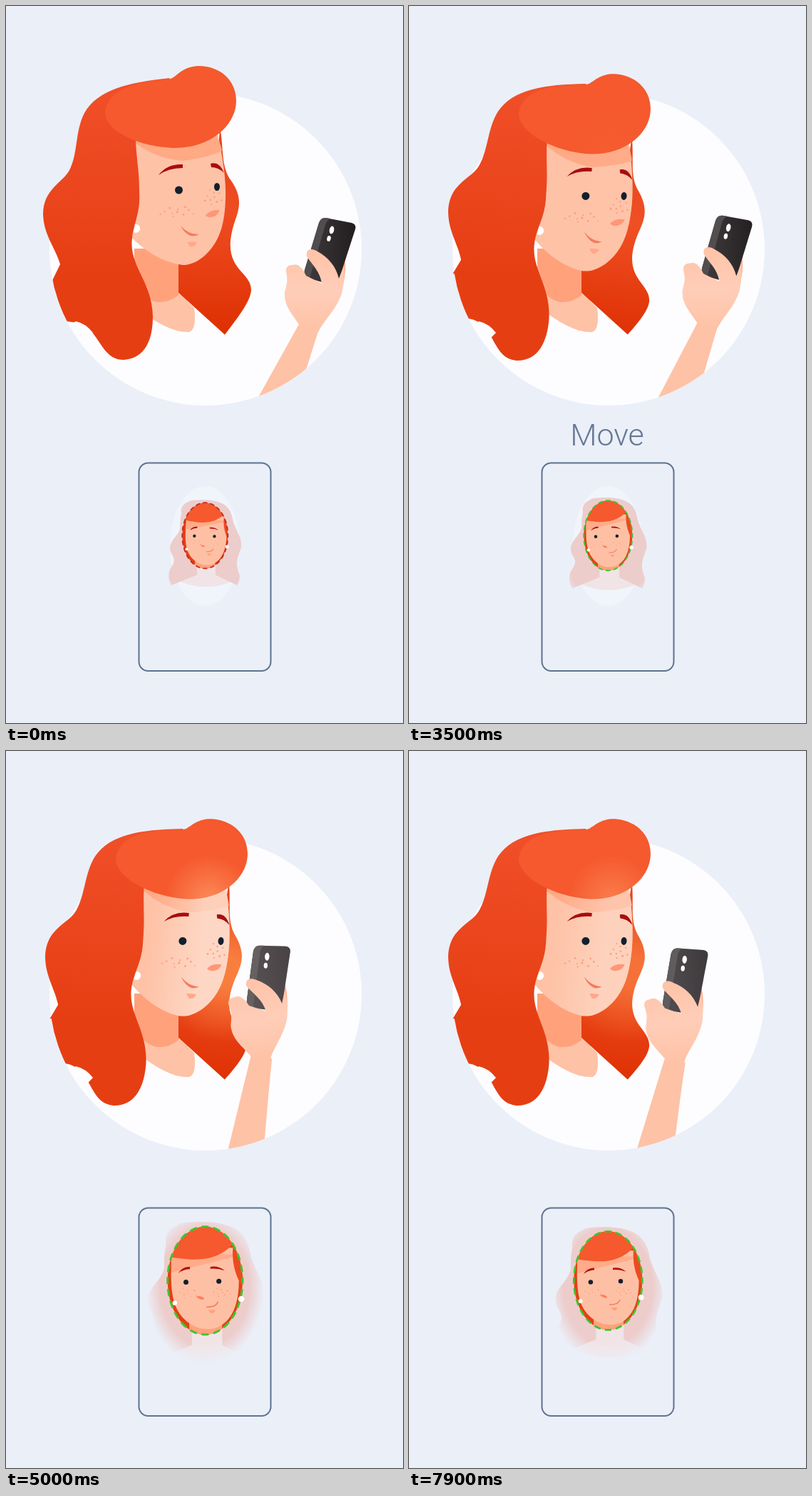
An HTML page that plays this animation: 557x1005 px, repeating every 8 s.

```html
<!DOCTYPE html>
<html lang="en">
<head>
<meta charset="utf-8">
<title>Face scan</title>
<style>
html, body { margin: 0; width: 100%; height: 100%; overflow: hidden; background: #ebeff8; }
svg { display: block; width: 100%; height: 100%; }
#word { font: 300 43px Roboto, "Open Sans", sans-serif; fill: #667896; }
</style>
</head>
<body>
<svg viewBox="0 0 557 1005">
  <defs>
    <linearGradient id="maneFill" x1="0" y1="0" x2="0" y2="1">
      <stop offset="0" stop-color="#f1502a"/><stop offset=".7" stop-color="#e63e13"/>
    </linearGradient>
    <linearGradient id="backFill" x1="0" y1="0" x2="0" y2="1">
      <stop offset="0" stop-color="#e4431b"/><stop offset=".4" stop-color="#ef4c22"/><stop offset="1" stop-color="#dc2e00"/>
    </linearGradient>
    <linearGradient id="handFill" x1="0" y1="0" x2="0" y2="1">
      <stop offset="0" stop-color="#ffc3a8"/><stop offset=".5" stop-color="#ffcdb8"/><stop offset="1" stop-color="#fec2a6"/>
    </linearGradient>
    <linearGradient id="phoneFill">
      <stop offset="0" stop-color="#3f3b3d"/><stop offset="1" stop-color="#221e20"/>
    </linearGradient>
    <linearGradient id="faceGlow" gradientUnits="userSpaceOnUse" x1="195" y1="0" x2="270" y2="0">
      <stop offset="0" stop-color="#fde0d2" stop-opacity="0"/><stop offset="1" stop-color="#fde0d2" stop-opacity=".85"/>
    </linearGradient>
    <radialGradient id="fringeGlow" gradientUnits="userSpaceOnUse" cx="274" cy="196" r="62">
      <stop offset="0" stop-color="#ff9a66" stop-opacity=".9"/><stop offset="1" stop-color="#ff9a66" stop-opacity="0"/>
    </radialGradient>
    <radialGradient id="backGlow" gradientUnits="userSpaceOnUse" cx="308" cy="295" r="100">
      <stop offset=".2" stop-color="#fb8a45"/><stop offset="1" stop-color="#fb8a45" stop-opacity="0"/>
    </radialGradient>
    <radialGradient id="fade">
      <stop offset=".76" stop-color="#fff"/><stop offset="1" stop-color="#fff" stop-opacity="0"/>
    </radialGradient>
    <mask id="vignette" maskUnits="userSpaceOnUse" x="186" y="640" width="186" height="292">
      <ellipse cx="279" cy="751" rx="83" ry="109" fill="url(#fade)"/>
    </mask>
    <clipPath id="disc"><circle cx="280" cy="341" r="219"/></clipPath>
    <clipPath id="bust"><circle cx="280" cy="341" r="219"/><path d="M0 0H557V375H0Z"/></clipPath>
    <clipPath id="oval"><ellipse rx="57" ry="82"/></clipPath>

    <path id="back" d="M300 170C306 200 301 225 316 245C333 270 327 285 320 305C300 370 344 370 344 398C343 415 325 437 300 470L235 440V340L295 250Z"/>
    <path id="face" d="M178 170H295C303 205 309 240 308 270C307 300 302 322 288 340C276 355 262 363 248 363C222 360 195 345 172 320Z"/>
    <path id="fringe" d="M139 150C141 118 180 106 225 103C240 103 243 84 272 84C302 85 323 105 323 133C323 165 290 199 236 199C180 197 139 172 139 150Z"/>
    <path id="phone" d="M449 297L485 304Q492 306 490 313L467 384Q464 391 456 391L423 381Q417 378 419 370L439 304Q442 296 449 297Z"/>
  </defs>

  <circle cx="280" cy="341" r="219" fill="#fdfdff"/>

  <g class="head">
    <use href="#back" fill="url(#backFill)"/>
    <use href="#back" class="glow" fill="url(#backGlow)"/>
  </g>
  <path d="M242 402L325 477L300 510H235Z" fill="#fdfdff"/>
  <path d="M180 340H242V402L264 423Q268 455 256 457Q226 458 180 420Z" fill="#fec2a6"/>
  <path d="M180 340H242V405Q230 416 212 415Q195 412 180 390Z" fill="#ffa27c"/>

  <g clip-path="url(#bust)">
    <g class="head">
      <use href="#face" fill="#fec2a6"/>
      <path d="M180 180H294Q301 192 303 203Q285 212 248 217Q210 214 180 191Z" fill="#ffa985"/>
      <use href="#face" class="glow" fill="url(#faceGlow)"/>
      <g id="freckles" fill="#ff9c7c"></g>
      <path id="brows" d="M214 237Q226 221 248 222V227Q228 227 214 237ZM287 221Q299 217 306 234Q298 226 288 226Z" fill="#a90c0e"/>
      <g fill="#131f2e"><circle cx="242.5" cy="258" r="5.5"/><ellipse cx="296" cy="253.5" rx="4" ry="5.5"/></g>
      <path d="M280 294Q285 285 300 286Q296 297 284 296Z" fill="#ff9676"/>
      <path d="M245 308Q255 320 271 320Q262 325 255 320Q248 315 245 308Z" fill="#f27d60"/>
      <path d="M254 331Q261 330 268 331Q264 339 258 337Z" fill="#ffa888"/>
      <path d="M230 101C170 107 128 118 110 150C97 175 101 205 90 228C82 247 52 255 52 292C53 322 70 340 76 362L60 395L70 440L100 444C132 452 132 496 165 496C197 494 206 465 206 435C205 385 172 365 177 325C179 305 189 290 187 260C187 230 183 215 182 188L205 150Z" fill="url(#maneFill)"/>
      <path d="M181 306A6 6 0 1 1 179 317Z" fill="#fff"/>
      <use href="#fringe" fill="#f5592d"/>
      <use href="#fringe" class="glow" fill="url(#fringeGlow)"/>
    </g>
    <path d="M80 453L98 442Q112 445 122 458L100 480Z" fill="#fdfdff"/>
  </g>

  <g clip-path="url(#disc)"><path id="arm" fill="#fec2a6"/></g>
  <g id="hand">
    <path d="M474 350Q479 365 472 395L458 405L460 370Z" fill="#ffab8c"/>
    <use href="#phone" fill="url(#phoneFill)"/>
    <path d="M449 297L455 298Q450 301 448 307L426 382L423 381Q417 378 419 370L439 304Q442 296 449 297Z" fill="#514d4e"/>
    <use href="#phone" class="glow" fill="#8a8084" fill-opacity=".45"/>
    <g fill="#fff"><ellipse cx="457" cy="314" rx="3.2" ry="5.5" transform="rotate(12 457 314)"/><ellipse cx="453" cy="326" rx="2.7" ry="4" transform="rotate(12 453 326)"/></g>
    <path d="M402 363C411 360 417 369 421 378L443 389C441 373 430 363 422 351C420 341 428 338 437 344C452 352 463 365 467 382L475 362C474 380 474 395 470 406C460 430 450 435 438 457L412 448C400 430 391 420 391 405C391 395 397 390 393 373C392 366 396 363 402 363Z" fill="url(#handFill)"/>
  </g>

  <text id="word" x="278" y="616" text-anchor="middle">Move</text>

  <ellipse cx="279" cy="757" rx="49" ry="84" fill="#f0f5fc"/>
  <g mask="url(#vignette)">
    <g class="zoom">
      <path d="M-22 70H26V98Q50 106 72 112Q38 128 2 128Q-34 128 -68 112Q-40 106 -22 98Z" fill="#f0e4e6"/>
      <g fill="#eccdcc">
        <circle cx="-37" cy="-61" r="23"/>
        <path d="M-30 -88C40 -94 62 -75 68 -45C72 -18 95 5 90 30C80 60 75 70 86 98Q88 110 80 124L26 98V60H-20V98L-84 124Q-95 105 -88 85C-75 65 -75 60 -84 45C-98 15 -66 5 -62 -20C-64 -60 -50 -88 -30 -88Z"/>
      </g>
    </g>
  </g>
  <g class="zoom">
    <g clip-path="url(#oval)">
      <g id="mini">
        <path d="M-80 -100H80V100H-80Z" fill="#e63e13"/>
        <path d="M-24 50H26V100H-24Z" fill="#ffa27c"/>
        <path d="M-50 -50C-54 10 -52 40 -30 60C-12 77 15 78 30 64C52 45 56 5 47 -50Z" fill="#fec0a4"/>
        <path d="M-52 -40H44V-36Q-5 -24 -51 -12Z" fill="#ffab89"/>
        <path d="M43 -57Q38 -20 57 10L80 -60Z" fill="#ec4a20"/>
        <path d="M-80 -100H80V-62L43 -56Q22 -32 -15 -32Q-35 -32 -80 -40Z" fill="#f5592d"/>
        <path d="M-41 -11Q-35 -21 -23 -21V-17.5Q-33 -17 -41 -11ZM8 -21Q20 -23 30 -15Q20 -19 8 -18Z" fill="#b4100e"/>
        <g fill="#131f2e"><circle cx="-29" cy="2.5" r="3.8"/><circle cx="21" cy="1" r="3.8"/></g>
        <path d="M-14 24Q-5 22 -1 28Q-6 31 -14 24Z" fill="#ff7f60"/>
        <path d="M2 40Q16 41 20 32" fill="none" stroke="#f27d60" stroke-width="1.8"/>
        <path d="M5 45Q11 44 16 45Q12 52 8 49Z" fill="#ffa080"/>
        <g id="miniFreckles" fill="#ff9070"></g>
      </g>
    </g>
    <ellipse id="ring" rx="57" ry="82" fill="none" stroke-width="3.2" pathLength="24" stroke-dasharray=".6 .4" stroke-dashoffset=".3"/>
    <g fill="#fff"><circle cx="-46" cy="34" r="3.5"/><circle cx="55" cy="28" r="4.5"/></g>
  </g>
  <rect x="186.500" y="640.500" width="185" height="291.500" rx="13" fill="none" stroke="#5d7390" stroke-width="2"/>
</svg>

<script>
const $ = id => document.getElementById(id);
const each = (cls, fn) => document.querySelectorAll('.' + cls).forEach(fn);
const mix = (a, b, k) => a + (b - a) * k;
const ramp = (t, from, to) => Math.min(1, Math.max(0, (t - from) / (to - from)));
const ease = u => (1 - Math.cos(Math.PI * u)) / 2;

let seed = 7;
const random = () => (seed = seed * 16807 % 2147483647) / 2147483647;

// Scatters small dots over an ellipse.
function scatter(group, count, cx, cy, rx, ry, size) {
  for (let i = 0; i < count; i++) {
    const angle = i * 2.4, reach = Math.sqrt((i + random()) / count);
    const dot = document.createElementNS(group.namespaceURI, 'circle');
    dot.setAttribute('cx', cx + rx * reach * Math.cos(angle));
    dot.setAttribute('cy', cy + ry * reach * Math.sin(angle));
    dot.setAttribute('r', size * mix(.8, 1.4, random()));
    group.append(dot);
  }
}
scatter($('freckles'), 11, 240, 289, 27, 8, 1.1);
scatter($('freckles'), 10, 291, 268, 13, 13, 1.1);
scatter($('miniFreckles'), 9, -27, 19, 16, 9, .8);
scatter($('miniFreckles'), 9, 24, 18, 15, 7, .8);

function draw() {
  const t = Math.floor(performance.now() % 8000 / 100) * 100;
  const nod = ease(ramp(t, 150, 1500));
  const near = ease(ramp(t, 3000, 5700)) - ease(ramp(t, 6900, 9400));

  each('head', e => e.setAttribute('transform', `translate(0 ${9.5 * nod}) rotate(${4.9 * nod} 258 320)`));
  $('brows').setAttribute('transform', `translate(0 ${-4 * nod})`);
  each('glow', e => e.setAttribute('opacity', near ** 1.2));

  const at = (x1, y1, x2, y2) => `${mix(x1, x2, near)} ${mix(y1, y2, near)}`;
  $('arm').setAttribute('d', `M${at(411, 446, 331, 424)}L${at(328, 595, 298, 595)}L${at(400, 575, 352, 590)}`
    + `Q${at(418, 520, 357, 490)} ${at(438, 456, 361, 428)}L${at(425, 425, 345, 400)}Z`);
  const lift = -25 * near * (1.4 - .4 * near);
  $('hand').setAttribute('transform', `translate(${-82 * near} ${lift}) rotate(${-11 * near} 425 445)`);

  each('zoom', e => e.setAttribute('transform', `translate(279.3 742.3) scale(${mix(.562, .99, near)})`));
  $('mini').setAttribute('transform', `translate(${2.5 * (1 - nod)} 0) rotate(${3 * (1 - nod)})`);
  $('ring').setAttribute('stroke', nod > .6 ? '#42c32c' : '#c32a1e');
  $('word').setAttribute('opacity', ramp(t, 2450, 2950) - ramp(t, 3700, 4200));
  requestAnimationFrame(draw);
}
draw();
</script>
</body>
</html>
```
